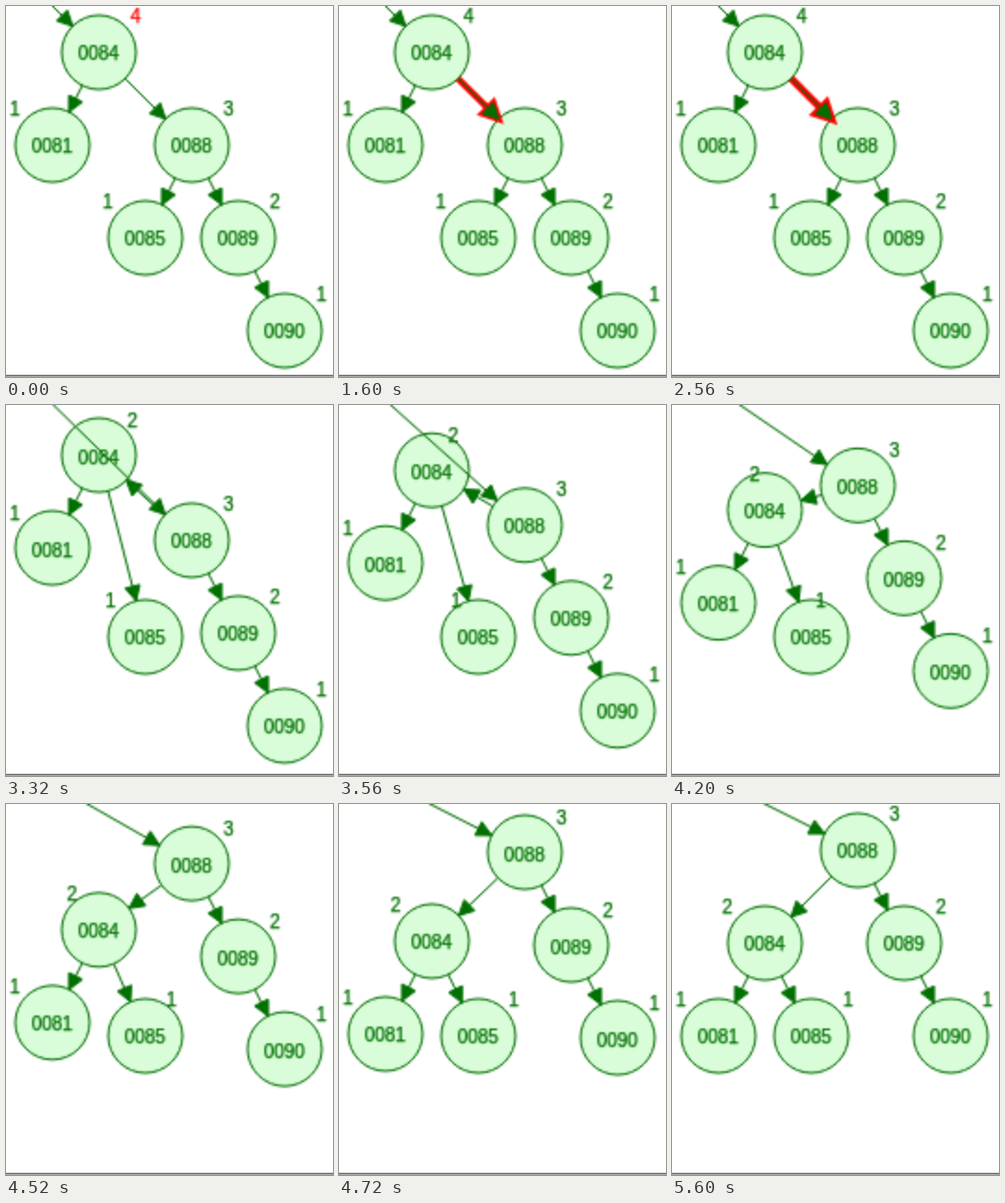
Write an HTML page with a canvas that moves like this. It is 352x400 px and loops after 6.4 s.

```html
<!DOCTYPE html>
<html lang="en">
<head>
<meta charset="utf-8">
<title>AVL tree: single left rotation</title>
<style>
  html, body { margin: 0; width: 100%; height: 100%; overflow: hidden; background: #fff; }
  canvas { display: block; }
</style>
</head>
<body>
<canvas id="stage" width="352" height="400"></canvas>
<script>
const WIDTH = 352, HEIGHT = 400;
const screen2d = document.getElementById('stage').getContext('2d');

// The tree is drawn at half resolution and enlarged, which softens all edges
const buffer = document.createElement('canvas');
buffer.width = WIDTH / 2;
buffer.height = HEIGHT / 2;
const ctx = buffer.getContext('2d');

const LOOP = 6400, FRAME = 40;
const HIGHLIGHT_AT = 1600;
const ROTATE_AT = 3255, TICK = 30, TICKS = 49;
const PULSE_PEAK = 2200, PULSE_PERIOD = 1680;

const GREEN = '#007000', FILL = '#d9fdd9', RED = '#ff0000', BORDER = '#666';
const RADIUS = 40, HEAD_LENGTH = 16, HEAD_WIDTH = 8;

// y: start and end height; side: label side (-1 left, 1 right) at start and end
const nodes = {
  84: { x: 100, y: [50, 150], side: [1, -1], height: [4, 2] },
  81: { x: 50, y: [150, 250], side: [-1, -1], height: [1, 1] },
  88: { x: 200, y: [150, 50], side: [1, 1], height: [3, 3] },
  85: { x: 150, y: [250, 250], side: [-1, 1], height: [1, 1] },
  89: { x: 250, y: [250, 150], side: [1, 1], height: [2, 2] },
  90: { x: 300, y: [350, 250], side: [1, 1], height: [1, 1] }
};
const parent = { x: 0, y: -50 };   // above the visible area

const edgesBefore = [['top', 84], [84, 81], [84, 88], [88, 85], [88, 89], [89, 90]];
const edgesAfter = [['top', 88], [84, 81], [88, 84], [84, 85], [88, 89], [89, 90]];

const mix = ([a, b], p) => a + (b - a) * p;

function drawText(text, x, y, color) {
  const left = x - 0.5;
  const base = 2 * Math.ceil(y / 2) + 8;   // baselines sit on whole buffer rows
  ctx.fillStyle = ctx.strokeStyle = color;
  ctx.lineWidth = 0.5;
  ctx.fillText(text, left, base);
  ctx.strokeText(text, left, base);
}

function drawCircle({ x, y }, text) {
  ctx.beginPath();
  ctx.arc(x, y, RADIUS, 0, 2 * Math.PI);
  ctx.fillStyle = FILL;
  ctx.fill();
  ctx.strokeStyle = GREEN;
  ctx.lineWidth = 2;
  ctx.stroke();
  drawText(text, x, y, GREEN);
}

function drawArrow(a, b, width, color) {
  const dist = Math.hypot(b.x - a.x, b.y - a.y);
  const ux = (b.x - a.x) / dist, uy = (b.y - a.y) / dist;
  const tipX = b.x - ux * RADIUS, tipY = b.y - uy * RADIUS;
  const backX = tipX - ux * HEAD_LENGTH, backY = tipY - uy * HEAD_LENGTH;

  ctx.strokeStyle = ctx.fillStyle = color;
  ctx.lineWidth = width;
  ctx.beginPath();
  ctx.moveTo(a.x + ux * RADIUS, a.y + uy * RADIUS);
  ctx.lineTo(tipX, tipY);
  ctx.stroke();

  ctx.beginPath();
  ctx.moveTo(tipX, tipY);
  ctx.lineTo(backX - uy * HEAD_WIDTH, backY + ux * HEAD_WIDTH);
  ctx.lineTo(backX + uy * HEAD_WIDTH, backY - ux * HEAD_WIDTH);
  ctx.closePath();
  ctx.stroke();
  ctx.fill();
}

// Triangle wave between 6 and 10
function pulseWidth(t) {
  const phase = Math.abs(t - PULSE_PEAK) / (PULSE_PERIOD / 2) % 2;
  return 6 + 4 * Math.abs(1 - phase);
}

function drawTree(t) {
  const rotated = t >= ROTATE_AT;
  const ticks = Math.floor((t - ROTATE_AT) / TICK);
  const p = Math.min(Math.max(ticks / TICKS, 0), 1);
  const highlighted = t >= HIGHLIGHT_AT && !rotated;

  ctx.fillStyle = '#fff';
  ctx.fillRect(0, 0, WIDTH, HEIGHT);

  const at = { top: parent };
  for (const id in nodes) {
    at[id] = { x: nodes[id].x, y: mix(nodes[id].y, p) };
    drawCircle(at[id], '00' + id);
  }
  for (const id in nodes) {
    const { side, height } = nodes[id];
    const color = id === '84' && t < HIGHLIGHT_AT ? RED : GREEN;
    drawText(height[+rotated], at[id].x + RADIUS * mix(side, p), at[id].y - RADIUS, color);
  }
  for (const [from, to] of rotated ? edgesAfter : edgesBefore) {
    if (highlighted && from === 84 && to === 88) {
      drawArrow(at[from], at[to], pulseWidth(t), RED);
    }
    drawArrow(at[from], at[to], 2, GREEN);
  }
}

function draw(t) {
  drawTree(t);
  screen2d.drawImage(buffer, 0, 0, WIDTH, HEIGHT);
  screen2d.fillStyle = BORDER;
  screen2d.fillRect(0, 397.7, WIDTH, 1.8);
}

ctx.scale(0.5, 0.5);
ctx.font = '20px "Liberation Sans", Arial, sans-serif';
ctx.textAlign = 'center';
ctx.textBaseline = 'alphabetic';

const start = performance.now();
function tick() {
  const t = (performance.now() - start) % LOOP;
  draw(Math.floor(t / FRAME) * FRAME);
  requestAnimationFrame(tick);
}
tick();
</script>
</body>
</html>
```
